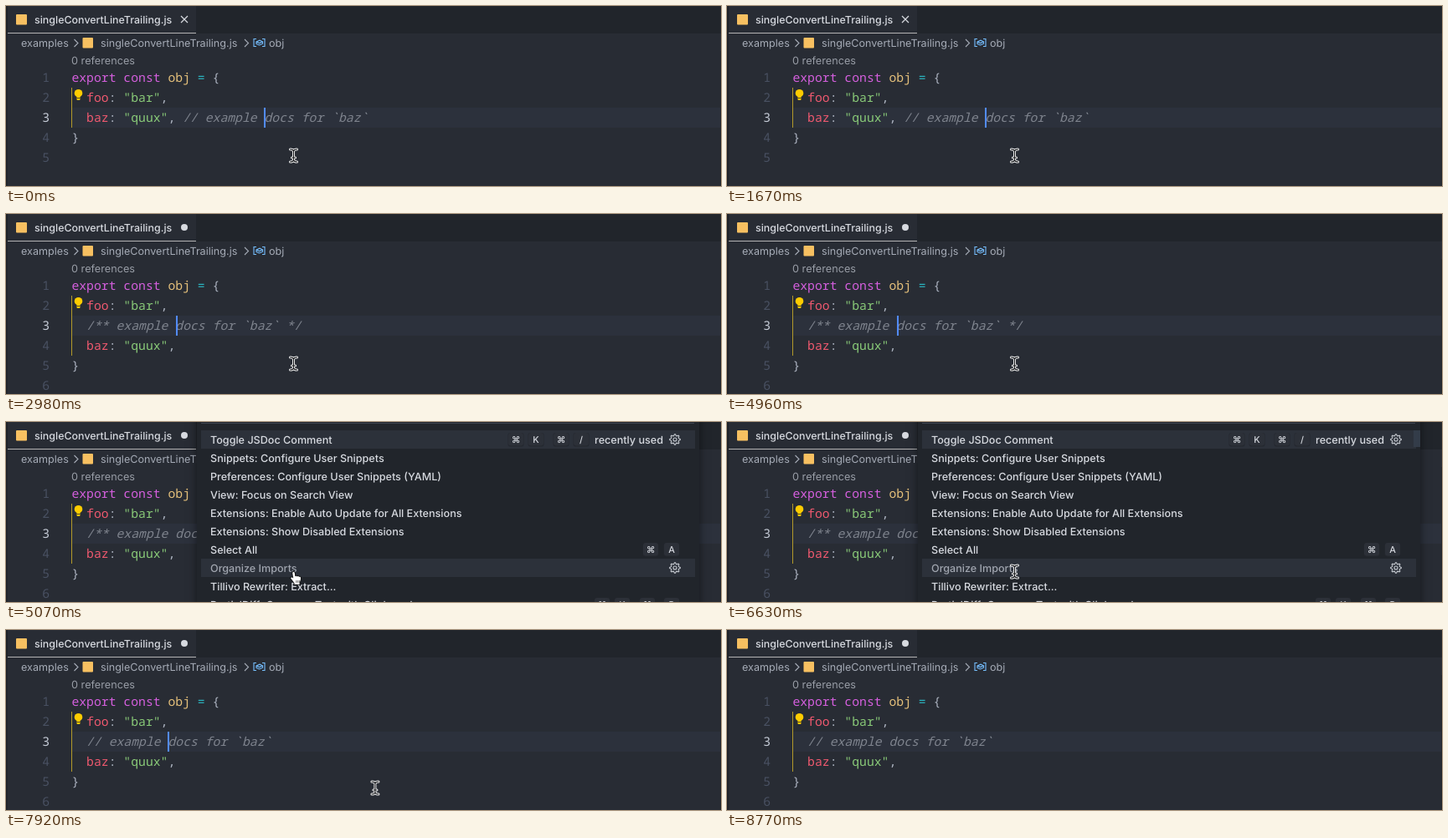
Animation, 854 px wide and 216 px high, one loop 8.79 s. Source, as an HTML page with a canvas:

```html
<!DOCTYPE html>
<html lang="en">
<head>
<meta charset="utf-8">
<title>Editor comment toggle</title>
<style>
  html, body { margin: 0; width: 100%; height: 100%; overflow: hidden; background: #282c34; }
  canvas { display: block; width: 854px; height: 216px; }
</style>
</head>
<body>
<canvas id="stage" width="854" height="216"></canvas>
<script>
const ctx = document.getElementById('stage').getContext('2d');
const LOOP = 8790, CHAR = 8.85, CODE_X = 78.4, ROW = 24;
const UI = 'Inter, "Noto Sans", sans-serif';
const MONO = '"Noto Sans Mono", "DejaVu Sans Mono", monospace';
const COLOR = {
  bg: '#282c34', panel: '#21252b', line: '#2c313c', row: '#2c313a', plain: '#abb2bf', key: '#d55fde',
  name: '#e5c07b', op: '#2bbac5', prop: '#ef596f', str: '#89ca78', note: '#7f848e',
  file: '#f7c061', bright: '#d7dae0', crumb: '#a5abb6'
};

const HEAD = [
  [['export const ', 'key'], ['obj', 'name'], [' = ', 'op'], ['{', 'plain']],
  [['  foo', 'prop'], [': ', 'plain'], ['"bar"', 'str'], [',', 'plain']]
];
const BAZ = [['  baz', 'prop'], [': ', 'plain'], ['"quux"', 'str'], [',', 'plain']];
const TAIL = [['}', 'plain']];
const note = text => [text, 'note'];
const DOCS = {
  trailing: { caret: 308, lines: [...HEAD, [...BAZ, note(' // example docs for `baz`')], TAIL, []] },
  block: { caret: 203, lines: [...HEAD, [note('  /** example docs for `baz` */')], BAZ, TAIL, []] },
  single: { caret: 193, lines: [...HEAD, [note('  // example docs for `baz`')], BAZ, TAIL, []] }
};

const MENU = [
  'Toggle JSDoc Comment', 'Snippets: Configure User Snippets',
  'Preferences: Configure User Snippets (YAML)', 'View: Focus on Search View',
  'Extensions: Enable Auto Update for All Extensions', 'Extensions: Show Disabled Extensions',
  'Select All', 'Organize Imports', 'Tillivo Rewriter: Extract...',
  'PartialDiff: Compare Text with Clipboard'
];

const CARET_ON = [[0, 180], [660, 1130], [1670, 1910], [2980, 3460], [3940, 4480],
  [4960, 5010], [6690, 7170], [7650, 8140], [8620, 8770]];
const POINTER_PATH = [[7150, 343.5, 179.5], [7270, 362, 184], [7400, 384.5, 189], [7650, 400, 190],
  [7850, 425, 190], [7960, 460, 189], [8025, 511, 189.5], [8087, 695, 199.5]];

const within = (t, [from, to]) => t >= from && t < to;

function rect(x, y, w, h, color) {
  ctx.fillStyle = color;
  ctx.fillRect(x, y, w, h);
}

function round(x, y, w, h, r, color) {
  ctx.fillStyle = color;
  ctx.beginPath();
  ctx.roundRect(x, y, w, h, r);
  ctx.fill();
}

function dot(x, y, r, color) {
  ctx.fillStyle = color;
  ctx.beginPath();
  ctx.arc(x, y, r, 0, Math.PI * 2);
  ctx.fill();
}

function stroke(d, color, width) {
  ctx.strokeStyle = color;
  ctx.lineWidth = width;
  ctx.stroke(new Path2D(d));
}

function at(x, y, draw) {
  ctx.save();
  ctx.translate(x, y);
  draw();
  ctx.restore();
}

function label(text, x, y, color, size = 12.6, weight = 500, align = 'left') {
  ctx.font = `${weight} ${size}px ${UI}`;
  ctx.textAlign = align;
  ctx.fillStyle = color;
  ctx.fillText(text, x, y);
}

function tabs(dirty) {
  rect(0, 0, 854, 33, COLOR.panel);
  rect(2, 0, 225, 33, COLOR.bg);
  rect(2, 32, 225, 1, '#b4b4b4');
  round(12, 10, 13, 12.5, 1, COLOR.file);
  label('singleConvertLineTrailing.js', 34, 20.5, COLOR.bright, 12.45);
  if (dirty) dot(213, 16, 4, COLOR.bright);
  else stroke('M209 12l8 8M217 12l-8 8', COLOR.bright, 1.2);
}

function crumbs() {
  label('examples', 18, 49, COLOR.crumb, 12.6, 400);
  stroke('M81.5 40l4.5 4.5-4.5 4.5M285 40l4.5 4.5-4.5 4.5', COLOR.crumb, 1.1);
  round(91.5, 38, 12.5, 12.5, 1, COLOR.file);
  label('singleConvertLineTrailing.js', 113, 49, COLOR.crumb, 12.6, 400);
  stroke('M299 39.5h-3v9h3M306 39.5h3v9h-3M299 43l4-1.8 3.5 1.6v2.4l-4 1.8-3.5-1.6zM299 43l3.5 1.6 4-1.8', '#75beff', 1.1);
  label('obj', 314, 49, COLOR.crumb, 12.6, 400);
}

function bulb() {
  dot(86.5, 104.7, 4.8, '#ffcc00');
  round(84.5, 108, 4, 5, 1, '#ffcc00');
  rect(84.5, 110, 4, 0.8, COLOR.bg);
}

function code({ lines, caret }, caretOn) {
  label('0 references', 78, 69.5, '#989da6', 12.7, 400);
  rect(79, 122, 775, ROW, COLOR.line);
  rect(78, 98, 1, ROW * (lines.length - 3), '#b39a2a');
  lines.forEach((line, i) => {
    const y = 91 + i * ROW;
    ctx.font = `500 14.75px ${MONO}`;
    ctx.textAlign = 'right';
    ctx.fillStyle = i === 2 ? '#c6ccd7' : '#495162';
    ctx.fillText(i + 1, 52, y);
    ctx.textAlign = 'left';
    let column = 0;
    for (const [text, kind] of line) {
      ctx.font = `${kind === 'note' ? 'italic 400' : '500'} 14.75px ${MONO}`;
      ctx.fillStyle = COLOR[kind];
      ctx.fillText(text, CODE_X + column * CHAR, y);
      column += text.length;
    }
  });
  bulb();
  if (caretOn) rect(caret, 122, 2, ROW, '#528bff');
  rect(853, 54, 1, 162, '#21252b');
}

function gear(x, y) {
  at(x, y, () => {
    ctx.strokeStyle = '#c5c9d0';
    ctx.lineWidth = 1.1;
    ctx.beginPath();
    for (let i = 0; i < 32; i++) {
      const r = i % 4 < 2 ? 6.3 : 4.7, a = (i - 0.5) * Math.PI / 16;
      ctx.lineTo(r * Math.cos(a), r * Math.sin(a));
    }
    ctx.closePath();
    ctx.stroke();
    ctx.beginPath();
    ctx.arc(0, 0, 2, 0, Math.PI * 2);
    ctx.stroke();
  });
}

function keycap(text, x, y) {
  round(x - 9.5, y - 8, 19, 16.5, 3, '#24282f');
  round(x - 9, y - 8, 18, 15.5, 3, '#2c3038');
  label(text, x, y + 4, COLOR.bright, 10.8, 500, 'center');
}

function menu(scrollbar) {
  ctx.save();
  ctx.shadowColor = 'rgba(0,0,0,.5)';
  ctx.shadowBlur = 10;
  rect(228, -20, 600, 260, COLOR.panel);
  ctx.restore();
  rect(233, 1, 589, 1, '#3e4450');
  rect(233, 10, 590, 22, COLOR.row);
  rect(233, 164, 590, 22, COLOR.row);
  if (scrollbar) rect(820, 10, 8, 20, '#333c49');
  MENU.forEach((text, i) => label(text, 244, 25.5 + i * 22, i === 7 ? '#a0a5af' : COLOR.bright));
  ['⌘', 'K', '⌘', '/'].forEach((key, i) => {
    keycap(key, [609, 633, 663, 687][i], 21);
    keycap(i === 3 ? 'P' : key, [712, 736, 766, 795][i], 219);
  });
  label('recently used', 703, 25.5, COLOR.bright);
  keycap('⌘', 770, 153);
  keycap('A', 795, 153);
  gear(799, 21);
  gear(799, 175);
}

function ibeam(x, y) {
  at(x, y, () => {
    const shape = 'M-4-7.5q3.4 0 4 2q.6-2 4-2M0-5.5v11M-4 7.5q3.4 0 4-2q.6 2 4 2M-2 2.5h4';
    ctx.lineCap = 'round';
    stroke(shape, '#f4f4f4', 3);
    stroke(shape, '#15171a', 1.1);
  });
}

function hand(x, y) {
  at(x, y, () => {
    const shape = 'M-3.8-6.3c0-1.7 2.5-1.7 2.6 0l.5 4.3c.3-1.1 2.2-1 2.4.2c.4-1 2.2-.7 2.3.5c.6-.8 2-.4 2 .9c.1 2.5-.5 4.2-1.4 5.6v2h-6.2v-1.8c-1.5-1.4-2.4-3.3-4-5c-.7-1.2.8-2 1.8-1.2l1 .9z';
    ctx.lineJoin = 'round';
    stroke(shape, '#111', 1.8);
    ctx.fillStyle = '#fff';
    ctx.fill(new Path2D(shape));
    stroke('M.8 2.5v3M2.8 2.5v3M4.7 2.5v3', '#222', 0.7);
  });
}

// The pointer moves in short discrete steps, as sampled by the recorder.
function pointerAt(t) {
  const time = 7400 + Math.floor((t - 7400) / 62.5) * 62.5;
  if (time <= POINTER_PATH[0][0]) return POINTER_PATH[0].slice(1);
  const next = POINTER_PATH.findIndex(point => point[0] >= time);
  if (next < 0) return POINTER_PATH.at(-1).slice(1);
  const [t0, x0, y0] = POINTER_PATH[next - 1], [t1, x1, y1] = POINTER_PATH[next];
  const k = (time - t0) / (t1 - t0);
  return [x0 + (x1 - x0) * k, y0 + (y1 - y0) * k];
}

function render(t) {
  const doc = t < 2980 ? DOCS.trailing : t < 6690 ? DOCS.block : DOCS.single;
  const menuOpen = within(t, [1910, 2980]) || within(t, [5010, 6690]);
  const closing = within(t, [2920, 2980]) || within(t, [6630, 6690]);
  const overItem = within(t, [1910, 2920]) || within(t, [5070, 6630]);
  rect(0, 0, 854, 216, COLOR.bg);
  tabs(t >= 2980);
  crumbs();
  code(doc, CARET_ON.some(span => within(t, span)));
  rect(0, 0, 1.5, 216, '#1d2026');
  if (menuOpen) menu(closing);
  if (overItem) hand(346, 187.5);
  else if (t < 8140) ibeam(...pointerAt(t));
}

ctx.textRendering = 'geometricPrecision';
const start = performance.now();
function tick() {
  render((performance.now() - start) % LOOP);
  requestAnimationFrame(tick);
}
tick();
</script>
</body>
</html>
```
